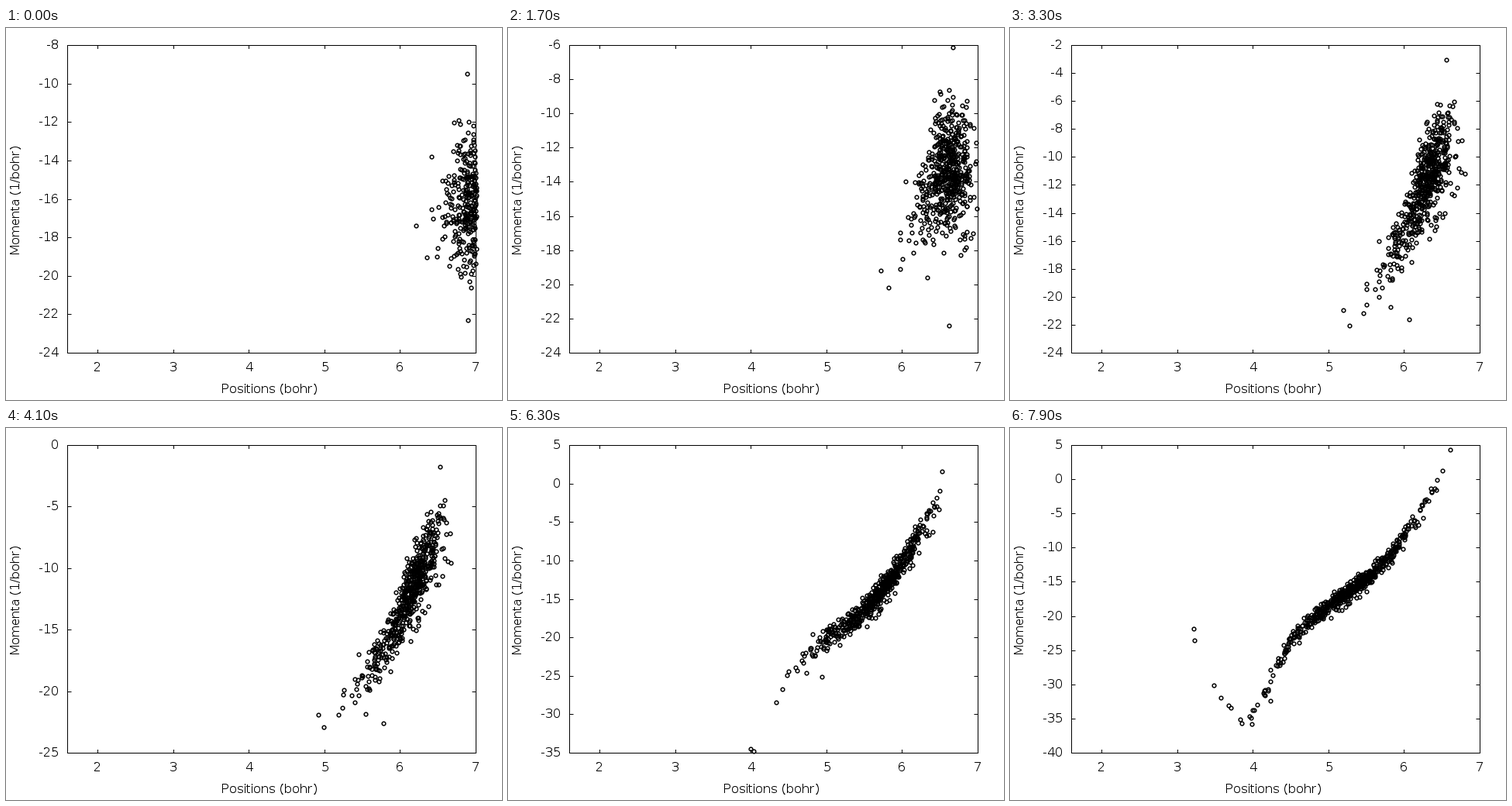
A matplotlib script for the animation above (8 s loop, 640 by 480 pixels).

```python
import numpy as np
import matplotlib.pyplot as plt
from matplotlib.animation import FuncAnimation
from matplotlib.collections import LineCollection

W, H, DPI = 640, 480, 80
PT = 72 / DPI                                  # points per pixel
LEFT, RIGHT, TOP, BOTTOM = 79, 606, 22, 419    # plot frame in pixels
X0, X1 = 1.6, 7.0
FRAMES, STEP_MS, SUB = 80, 100, 10
RATE = 0.0161                                  # dx/dt per unit of momentum
TICK, MAX_TICKS = 5, 12

# Starting (position, momentum) of the particles far from the cloud
LOOSE = [(6.88, -9.45), (6.2, -17.35), (6.34, -19), (6.89, -22.25), (7.265, -24.7),
         (6.41, -13.75), (6.41, -16.5), (6.43, -17), (6.48, -18.95), (6.49, -18.5)]


def start_cloud(count=560):
    rng = np.random.default_rng(11)
    z = rng.normal(size=(2, 2 * count)) * rng.uniform(0.5, 1.25, 2 * count)
    x, p = 6.99 + 0.23 * z[0], -16.1 + 2.2 * z[1]
    keep = (np.hypot(*z) < 2.35) & (x > 6.48)
    cloud = np.array([x, p])[:, keep][:, :count]
    return np.hstack([np.transpose(LOOSE), cloud])


def bump(x, mid, width):
    return np.exp(-((x - mid) / width) ** 2)


def force(x):
    wall = 6.5 * (1 - np.tanh((x - 3.84) / 0.14))
    well = -11.4 / (1 + ((x - 4.17) / 0.29) ** 2)
    slope = -1.05 * bump(x, 5.8, 0.4)
    barrier = 2.2 * bump(x, 6.68, 0.35) + 0.5 * bump(x, 7.35, 0.45)
    return wall + well + slope + barrier


def simulate():
    x, p = start_cloud()
    dt = STEP_MS / 1000 / SUB
    states = []
    for _ in range(FRAMES):
        states.append((x.copy(), p.copy()))
        for _ in range(SUB):
            p += force(x) * dt / 2
            x += RATE * p * dt
            p += force(x) * dt / 2
    return states


def px(x):
    return LEFT + (x - X0) / (X1 - X0) * (RIGHT - LEFT)


def py(y, lo, hi):
    return BOTTOM - (y - lo) / (hi - lo) * (BOTTOM - TOP)


def centre(v):
    """Middle of the nearest pixel."""
    return np.floor(np.asarray(v) + 0.5) + 0.5


states = simulate()

plt.rcParams.update({"font.family": "DejaVu Sans", "text.hinting": "default",
                     "text.hinting_factor": 1})
fig = plt.figure(figsize=(W / DPI, H / DPI), dpi=DPI, facecolor="white")
ax = fig.add_axes([0, 0, 1, 1])
ax.set(xlim=(0, W), ylim=(H, 0))
ax.axis("off")

line = dict(color="black", lw=PT, snap=False, solid_capstyle="projecting",
            solid_joinstyle="miter")
text = dict(fontsize=16 * PT, color="black")
l, r, t, b = (v + 0.5 for v in (LEFT, RIGHT, TOP, BOTTOM))
ax.plot([l, r, r, l, l], [t, t, b, b, t], **line)

for value in range(2, 8):
    x = centre(px(value))
    ax.plot([x, x], [b, b - TICK + 1], **line)
    ax.plot([x, x], [t, t + TICK - 1], **line)
    ax.text(x, 443, str(value), ha="center", **text)
ax.text(340.5, 471, "Positions (bohr)", ha="center", **text)
ax.text(21, 221, "Momenta (1/bohr)", rotation=90, ha="right", va="center", **text)

ticks = ax.add_collection(LineCollection([], colors="black", linewidths=PT,
                                         snap=False))
labels = [ax.text(68, 0, "", ha="right", **text) for _ in range(MAX_TICKS)]
dots, = ax.plot([], [], "o", ms=4.7 * PT, mew=1.5 * PT, mfc="none", mec="black",
                antialiased=False)


def update(i):
    x, p = states[i]
    shown = x <= X1
    x, p = x[shown], p[shown]

    step = 2 if np.ptp(p) < 20 else 5
    lo = int(np.floor(p.min() / step)) * step
    hi = int(np.ceil(p.max() / step)) * step
    values = range(lo, hi + 1, step)

    for label in labels:
        label.set_text("")
    segments = []
    for label, value in zip(labels, values):
        y = centre(py(value, lo, hi))
        segments += [[(l, y), (l + TICK, y)], [(r, y), (r - TICK, y)]]
        label.set_text(str(value))
        label.set_y(y + 4.5)
    ticks.set_segments(segments)
    dots.set_data(centre(px(x)), centre(py(p, lo, hi)))
    return [dots, ticks, *labels]


anim = FuncAnimation(fig, update, frames=FRAMES, interval=STEP_MS,
                     repeat=True, repeat_delay=0, blit=False)
plt.show()
```
